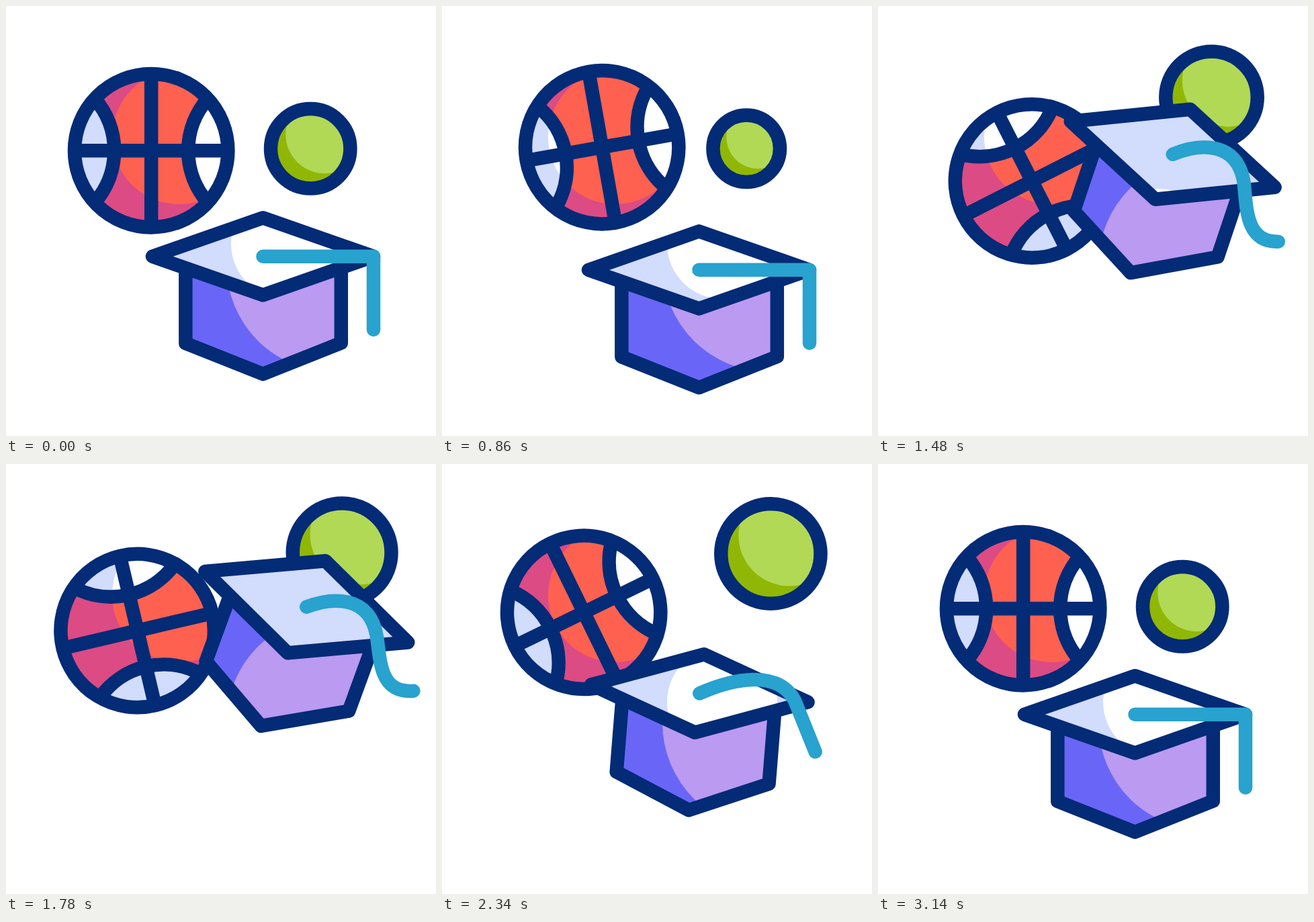
An HTML page for the animation above (3.2 s loop, 640x640 px).

```html
<!DOCTYPE html>
<html lang="en">
<head>
<meta charset="utf-8">
<title>Ball, cap and ball</title>
<style>
  html, body { margin: 0; width: 100%; height: 100%; overflow: hidden; background: #fff; }
  svg { display: block; width: 100%; height: 100%; }
  .line { fill: none; stroke: #042b76; stroke-width: 20.5; stroke-linecap: round; stroke-linejoin: round; }
  .seam { stroke-linecap: butt; }
  #tassel { stroke: #28a2ce; }
</style>
</head>
<body>
<svg viewBox="0 0 640 640">
  <defs>
    <clipPath id="discClip"><circle class="spin" r="114.2"/></clipPath>
    <clipPath id="lensClip">
      <path class="spin" d="M-84-77A116.7 116.7 0 0 1-84 77A114 114 0 0 1-84-77ZM84-77A116.7 116.7 0 0 0 84 77A114 114 0 0 0 84-77Z"/>
    </clipPath>
    <clipPath id="smallClip"><circle id="smallDisc"/></clipPath>
    <clipPath id="bodyClip"><path id="bodyShape"/></clipPath>
    <clipPath id="boardClip"><path id="boardShape"/></clipPath>
  </defs>

  <g clip-path="url(#smallClip)">
    <rect width="640" height="640" fill="#91b706"/>
    <circle id="smallLight" fill="#b1d955"/>
  </g>
  <circle id="smallRing" class="line"/>

  <!-- The lights stay on the stage while the shapes move over them. -->
  <g clip-path="url(#discClip)">
    <rect width="640" height="640" fill="#dc4b84"/>
    <circle cx="258" cy="195" r="100" fill="#ff6150"/>
  </g>
  <g clip-path="url(#lensClip)">
    <rect width="640" height="640" fill="#d2dcfd"/>
    <circle cx="258" cy="195" r="100" fill="#fff"/>
  </g>
  <g class="spin">
    <path class="line seam" d="M-114 0H114M0-114V114M-84-77A116.7 116.7 0 0 1-84 77M84-77A116.7 116.7 0 0 0 84 77"/>
    <circle class="line" r="114.2"/>
  </g>

  <g clip-path="url(#bodyClip)">
    <rect width="640" height="640" fill="#6966f7"/>
    <circle cx="488" cy="385" r="160" fill="#bb9af1"/>
  </g>
  <path id="bodyLine" class="line"/>
  <g clip-path="url(#boardClip)">
    <rect width="640" height="640" fill="#d2dcfd"/>
    <circle cx="417" cy="354" r="82" fill="#fff"/>
  </g>
  <path id="boardLine" class="line"/>
  <path id="tassel" class="line"/>
</svg>

<script>
const LOOP = 3200;
const $ = id => document.getElementById(id);
const setPath = (id, d) => $(id).setAttribute('d', d);
const spinners = document.querySelectorAll('.spin');

const mix = (a, b, p) => a + (b - a) * p;
const part = (t, from, to) => Math.min(1, Math.max(0, (t - from) / (to - from)));
const smooth = (t, from, to) => { const p = part(t, from, to); return p * p * (3 - 2 * p); };

const add = (p, x, y) => [p[0] + x, p[1] + y];
const along = (a, b, p) => [mix(a[0], b[0], p), mix(a[1], b[1], p)];

// Shared phases: wind up, leap, float, fall, land, settle.
const lift = t => (1 - (1 - part(t, 1060, 1400)) ** 3) * (1 - smooth(t, 2110, 2440));
const windUp = t => part(t, 100, 1060) ** 2 * (1 - lift(t)) * (t < 1600);
const float = t => (t - 1480) / 580;
const land = t => smooth(t, 2290, 2490) - smooth(t, 2490, 2800);
const settle = t => smooth(t, 2440, 2800) - smooth(t, 2820, 3140);

function setCircle(id, x, y, r) {
  $(id).setAttribute('cx', x);
  $(id).setAttribute('cy', y);
  $(id).setAttribute('r', r);
}

function drawBig(t) {
  const up = lift(t - 20), wind = windUp(t), f = Math.min(float(t), 1.1);
  const x = mix(216.2, 229.2 - 38.5 * Math.sin(2.04 * f), up) + 35 * wind;
  const y = mix(215.2, 260.5 - 24 * f, up) - 8 * wind;
  const angle = mix(t < 1600 ? 0 : 180, 63 + 26.5 * f, up) - 16 * wind;
  for (const el of spinners) el.setAttribute('transform', `translate(${x} ${y}) rotate(${angle})`);
}

function drawSmall(t) {
  const up = lift(t - 105), f = float(t);
  const x = 453.2 + up * (43.3 + 7 * f);
  const y = 212.3 - (1 - (1 - up) ** 2) * (76.3 + 8 * f);
  const r = 59.2 + up * (9 + 10 * f) - 15 * windUp(t) - 7 * land(t) - 6 * settle(t);
  const inner = r - 10;
  setCircle('smallDisc', x, y, r);
  setCircle('smallRing', x, y, r);
  setCircle('smallLight', x + inner * .43, y - inner * .43, inner * 1.18);
}

function drawTassel(knot, right, bend, f) {
  const bow = Math.min(1, 2 * bend), curl = Math.max(0, 2 * bend - 1);
  const corner = add(right, -46 * bend, -6 * bend);
  const end = add(corner, 36 * bow + (15 + 6 * f) * curl, 109 - 38 * bow + (16 - 17 * f) * curl);
  const curve = [
    add(along(knot, corner, 1 / 3), 3 * bow, -30 * bow),
    add(along(knot, corner, 2 / 3), 26 * bow, -50 * bow),
    corner,
    add(along(corner, end, 1 / 3), -13 * curl, 10 * curl),
    add(along(corner, end, 2 / 3), -31 * curl, 30 * curl),
    end
  ];
  setPath('tassel', `M${knot}C${curve.join(' ')}`);
}

function drawCap(t) {
  const up = lift(t), f = float(t);
  const tilt = up * (1 + .15 * f) - .09 * settle(t);
  const center = [
    382.5 + up ** 3 * (56.2 + 16.5 * f),
    372.75 - up * (152 + 15.5 * f) + 32 * windUp(t) + 40 * land(t) + 3 * settle(t)
  ];

  // The board is spanned by two half axes, the body hangs along one side vector.
  const wide = [164.5 - 12.5 * tilt, 49 * tilt];
  const deep = [-26 * tilt, 57.5 + 9.5 * tilt ** 2];
  const side = [-33 * tilt, 112 - 13.5 * tilt];
  const drop = 1.05 + .06 * tilt;
  const right = add(center, ...wide), left = add(center, -wide[0], -wide[1]);
  const front = add(center, ...deep), back = add(center, -deep[0], -deep[1]);
  const bodyLeft = along(left, front, .3), bodyRight = along(right, front, .293);
  const body = [
    bodyLeft, add(bodyLeft, ...side), add(front, side[0] * drop, side[1] * drop),
    add(bodyRight, ...side), bodyRight
  ];

  const board = `M${[back, right, front, left].join('L')}Z`;
  setPath('boardShape', board);
  setPath('boardLine', board);
  setPath('bodyLine', `M${body.join('L')}`);
  setPath('bodyShape', `M${[...body, front].join('L')}Z`);
  drawTassel(center, right, lift(t - 50), f);
}

function frame() {
  const t = performance.now() % LOOP;
  drawSmall(t);
  drawBig(t);
  drawCap(t);
  requestAnimationFrame(frame);
}
frame();
</script>
</body>
</html>
```
